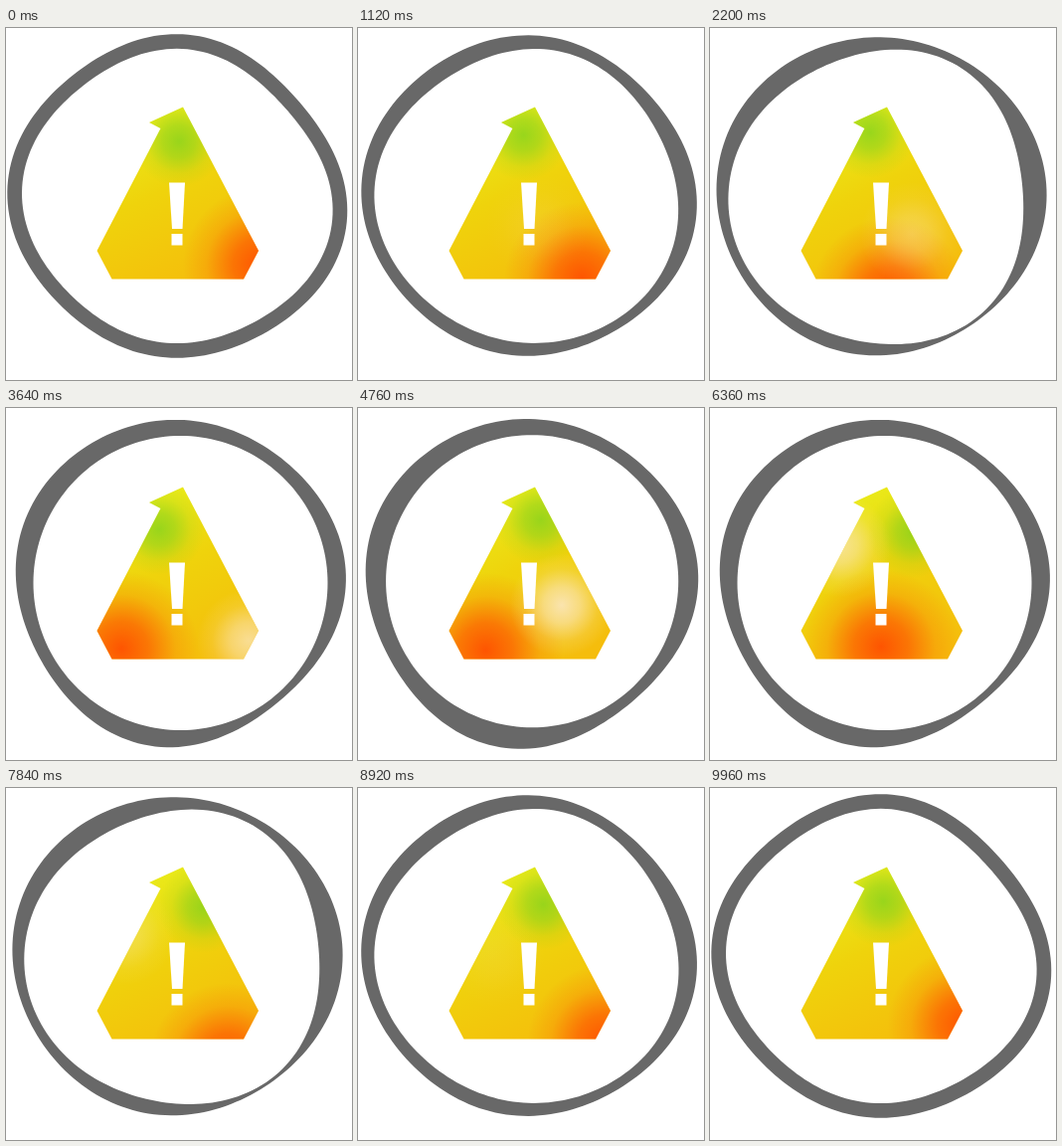
Recreate the animation shown at these times as an HTML page with a canvas. Size 348 by 354 pixels, loop 10 s.

```html
<!DOCTYPE html>
<html lang="en">
<head>
<meta charset="utf-8">
<title>Warning badge</title>
<style>
html, body { margin: 0; width: 100%; height: 100%; overflow: hidden; background: #fff; }
canvas { display: block; }
</style>
</head>
<body>
<canvas id="stage" width="348" height="354"></canvas>
<script>
const ctx = document.getElementById('stage').getContext('2d');
const LOOP = 10000, STEP = 40;
const TIMES = [0, 2200, 3640, 5000, 6360, 7800];

// An outline is a circle bent by cosine and sine waves of order 2, 3 and 4.
const outline = (x, y, radius, bends = [0, 0, 0, 0, 0, 0]) => [x, y, radius, ...bends];

const kite = [3.9, 3.1, .1, 1.95, 3, 1.5];
const egg = [3, .4, 1.2, -1.1, .7, .5];
const shield = [.4, 0, -4.5, 1.25, -1.1, .6];
const pebble = [.7, -.1, 2.5, -2.4, 1.8, 1];

const even = { outer: outline(171.9, 170.9, 163.7, kite), inner: outline(171.9, 170.9, 149, kite) };
const tilted = { outer: outline(171.4, 168.2, 162.3, egg), inner: outline(171.2, 171.3, 149, shield) };
const lowered = { outer: outline(173.5, 174, 163.4, pebble), inner: outline(175.5, 176, 148) };
const heavy = { outer: outline(172.5, 174.3, 164.7, pebble), inner: outline(175, 174, 147) };

// The ring goes through its poses and back again.
const poses = [even, tilted, lowered, heavy, lowered, tilted];
const outerTrack = poses.map(pose => pose.outer);
const innerTrack = poses.map(pose => pose.inner);

const fadeInOut = time => Math.sin(Math.PI * time / LOOP) ** 2;
const blobs = [
  { color: '125,210,30', radius: 46, strength: () => .75,
    path: [[174, 114], [161, 105], [154, 122], [189, 112], [204, 125], [199, 120]] },
  { color: '255,75,0', radius: 78, strength: () => .92,
    path: [[256, 238], [180, 268], [116, 242], [134, 244], [172, 240], [222, 274]] },
  { color: '250,228,175', radius: 52, strength: fadeInOut,
    path: [[160, 190], [203, 207], [244, 234], [194, 189], [130, 138], [118, 146]] }
];

// Smooth periodic interpolation through one array of values per key time.
function sample(track, time) {
  const n = TIMES.length;
  const at = i => TIMES[(i + n) % n] + Math.floor(i / n) * LOOP;
  const key = i => track[(i + n) % n];
  let i = n - 1;
  while (time < TIMES[i]) i--;
  const span = at(i + 1) - at(i), u = (time - at(i)) / span;
  const u2 = u * u, u3 = u2 * u;
  const slope = (k, j) => (key(k + 1)[j] - key(k - 1)[j]) / (at(k + 1) - at(k - 1)) * span;
  return key(i).map((v, j) =>
    (2 * u3 - 3 * u2 + 1) * v + (3 * u2 - 2 * u3) * key(i + 1)[j] +
    (u3 - 2 * u2 + u) * slope(i, j) + (u3 - u2) * slope(i + 1, j));
}

function addOutline(path, [x, y, radius, ...bends]) {
  for (let degrees = 0; degrees < 360; degrees += 2) {
    const angle = degrees * Math.PI / 180;
    let r = radius;
    for (let order = 2; order <= 4; order++) {
      const k = 2 * (order - 2);
      r += bends[k] * Math.cos(order * angle) + bends[k + 1] * Math.sin(order * angle);
    }
    const point = [x + r * Math.cos(angle), y + r * Math.sin(angle)];
    if (degrees) path.lineTo(...point);
    else path.moveTo(...point);
  }
  path.closePath();
}

function polygon(...points) {
  const path = new Path2D();
  points.forEach(point => path.lineTo(...point));
  path.closePath();
  return path;
}

const sign = polygon([178, 79.5], [254, 224], [239, 252.5], [106.5, 252.5], [91.5, 224], [155.5, 101], [144, 95]);
const bar = polygon([164, 155.5], [180, 155.5], [177.5, 202], [167, 202]);
const dot = polygon([166.5, 207], [177.5, 207], [177.5, 218.5], [166.5, 218.5]);

const base = ctx.createLinearGradient(125, 85, 205, 255);
base.addColorStop(0, '#e8ee1c');
base.addColorStop(.45, '#efd30c');
base.addColorStop(1, '#f5bd0c');

function drawRing(time) {
  const ring = new Path2D();
  addOutline(ring, sample(outerTrack, time));
  addOutline(ring, sample(innerTrack, time));
  ctx.fillStyle = '#686868';
  ctx.fill(ring, 'evenodd');
}

function drawBlob({ color, radius, strength, path }, time) {
  const [x, y] = sample(path, time);
  const alpha = strength(time);
  const glow = ctx.createRadialGradient(x, y, 0, x, y, radius);
  glow.addColorStop(0, `rgba(${color},${alpha})`);
  glow.addColorStop(.35, `rgba(${color},${alpha * .7})`);
  glow.addColorStop(.7, `rgba(${color},${alpha * .2})`);
  glow.addColorStop(1, `rgba(${color},0)`);
  ctx.fillStyle = glow;
  ctx.fill(sign);
}

function drawSign(time) {
  ctx.fillStyle = base;
  ctx.fill(sign);
  blobs.forEach(blob => drawBlob(blob, time));
  ctx.fillStyle = '#fff';
  ctx.fill(bar);
  ctx.fill(dot);
}

const start = performance.now();
function draw() {
  const elapsed = performance.now() - start;
  const time = Math.floor(elapsed % LOOP / STEP) * STEP;
  ctx.fillStyle = '#fff';
  ctx.fillRect(0, 0, 348, 354);
  drawRing(time);
  drawSign(time);
  requestAnimationFrame(draw);
}
draw();
</script>
</body>
</html>
```
